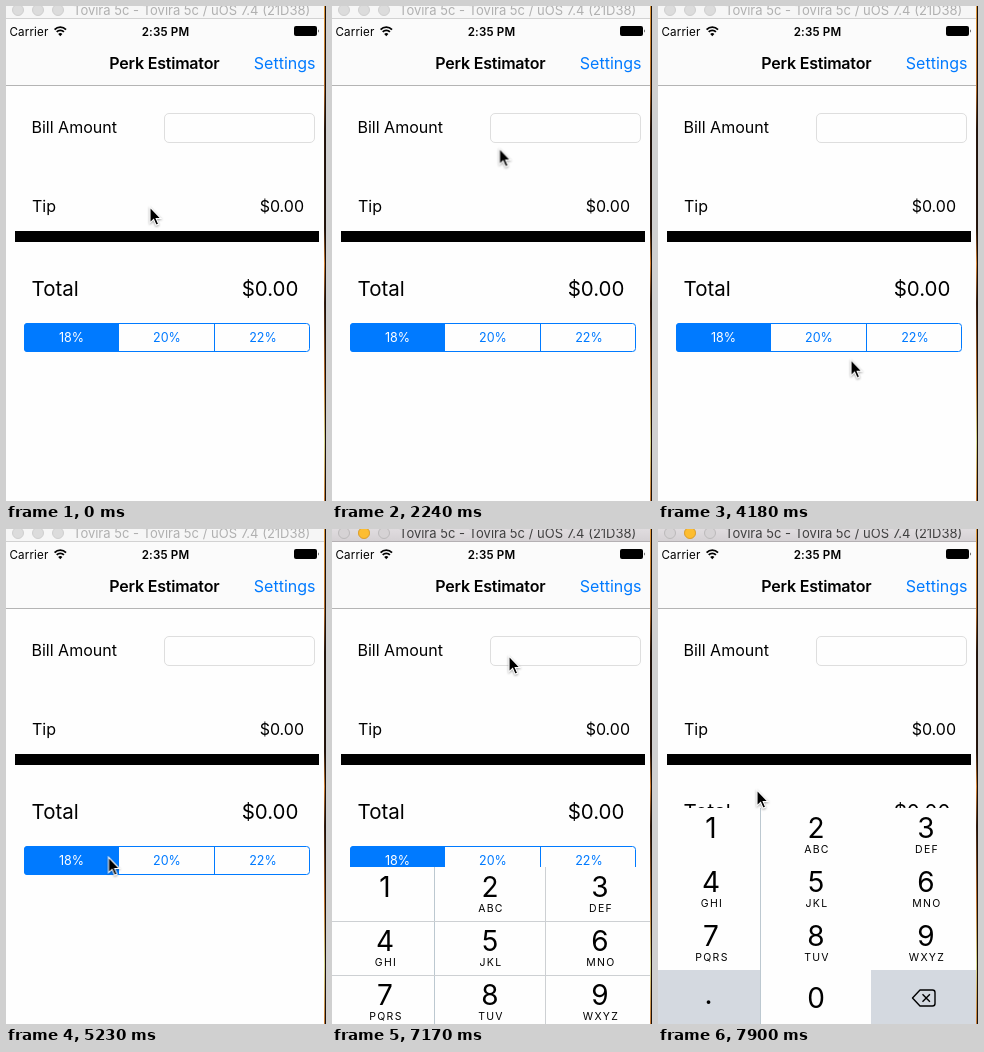
An HTML page that plays this animation: 320x495 px, repeating every 8000 ms.

```html
<!DOCTYPE html>
<html lang="en">
<head>
<meta charset="utf-8">
<title>Perk Estimator</title>
<style>
html, body { margin: 0; width: 100%; height: 100%; overflow: hidden; background: #fefefe; }
svg { display: block; width: 100%; height: 100%; }
text { font-family: Inter, Roboto, "Liberation Sans", sans-serif; white-space: pre; }
.label { font-size: 16px; }
.nav { font-size: 16px; font-weight: 600; letter-spacing: -.2px; }
.total { font-size: 20.5px; }
.status { font-size: 11.6px; letter-spacing: .15px; }
.bar { font-size: 13px; }
.seg { font-size: 12.5px; fill: #007aff; }
.digit { font-size: 28px; }
.letters { font-size: 10.5px; letter-spacing: 1.3px; }
.mid { text-anchor: middle; }
.end { text-anchor: end; }
.blue { fill: #007aff; }
#arrow { filter: drop-shadow(0 1px 1px rgba(0, 0, 0, .35)); }
</style>
</head>
<body>
<svg viewBox="0 0 320 495" preserveAspectRatio="none">
  <defs>
    <linearGradient id="desk" x2="0" y2="1">
      <stop offset="0" stop-color="#e09a3c"/>
      <stop offset=".17" stop-color="#b06a2a"/>
      <stop offset=".25" stop-color="#2a180e"/>
      <stop offset=".45" stop-color="#2a180e"/>
      <stop offset=".52" stop-color="#d88434"/>
      <stop offset=".6" stop-color="#3a2012"/>
      <stop offset=".75" stop-color="#c07430"/>
      <stop offset=".88" stop-color="#d8d890"/>
      <stop offset="1" stop-color="#c87a34"/>
    </linearGradient>
    <linearGradient id="chrome" x2="0" y2="1">
      <stop offset="0" stop-color="#e0dcdf"/>
      <stop offset="1" stop-color="#d4d0d3"/>
    </linearGradient>
    <g id="lights">
      <circle cx="12" cy="4" r="5.5"/><circle cx="32" cy="4" r="5.5"/><circle cx="52" cy="4" r="5.5"/>
    </g>
    <text id="caption" class="bar" x="67" y="9">Tovira 5c - Tovira 5c / uOS 7.4 (21D38)</text>
  </defs>

  <rect width="320" height="495" fill="#fefefe"/>
  <rect y="13" width="318" height="66" fill="#fbfbfb"/>
  <rect y="79" width="318" height="1" fill="#b4b4b4"/>

  <!-- window bar, idle and focused -->
  <g>
    <rect width="318" height="13" fill="#f6f6f6"/>
    <path d="M0 12.5H318" stroke="#d2d2d2"/>
    <use href="#lights" fill="#dcdcdc" stroke="#cfcfcf"/>
    <use href="#caption" fill="#b0b0b0"/>
  </g>
  <g id="focus" opacity="0">
    <rect width="318" height="13" fill="url(#chrome)"/>
    <path d="M0 12.5H318" stroke="#b4b0b3"/>
    <use href="#lights" fill="#d6d3d5" stroke="#bcbabb"/>
    <circle cx="32" cy="4" r="5.5" fill="#fdbd30" stroke="#e0a02a"/>
    <use href="#caption" fill="#404040"/>
  </g>

  <!-- status bar -->
  <text class="status" x="3.5" y="29.5">Carrier</text>
  <g fill="none" stroke="#000" stroke-width="1.8">
    <path d="M48.6 23.6a8 8 0 0 1 11.4 0M50.7 25.9a5 5 0 0 1 7.2 0"/>
    <path d="M54.3 30.2l-2.1-2.2a3 3 0 0 1 4.2 0z" fill="#000" stroke="none"/>
  </g>
  <text class="status mid" x="159.5" y="29.5" font-weight="600">2:35 PM</text>
  <rect x="288" y="20" width="23" height="10" rx="2"/>
  <path d="M312 23.2q1.5 1.8 0 3.6z"/>

  <text class="nav mid" x="158.3" y="63">Perk Estimator</text>
  <text class="label blue end" x="309.5" y="63">Settings</text>

  <!-- form -->
  <text class="label" x="25.5" y="127">Bill Amount</text>
  <rect x="158.5" y="107.5" width="150" height="29" rx="4.5" fill="#fefefe" stroke="#dedede"/>
  <text class="label" x="26" y="206">Tip</text>
  <text class="label end" x="298" y="206">$0.00</text>
  <rect x="9" y="225" width="304" height="11"/>
  <text class="total" x="25.5" y="290">Total</text>
  <text class="total end" x="292.5" y="289.5">$0.00</text>

  <rect x="18.5" y="317.5" width="285" height="28" rx="3" fill="#fefefe" stroke="#007aff"/>
  <path class="blue" d="M113 317H21.5a3.5 3.5 0 0 0-3.5 3.5V342.5a3.5 3.5 0 0 0 3.5 3.5H113z"/>
  <path d="M208.5 318v28" stroke="#007aff"/>
  <text class="seg mid" x="65.5" y="336" style="fill:#fff">18%</text>
  <text class="seg mid" x="161" y="336">20%</text>
  <text class="seg mid" x="257" y="336">22%</text>

  <g id="pad" transform="translate(0 500)"></g>

  <rect x="318" width="2" height="495" fill="#1c110b"/>
  <rect x="318" width="1" height="495" fill="url(#desk)"/>
  <path id="arrow" d="M0 0V15.8L3.6 12.4 6.1 18.2 8.6 17.1 6.2 11.5H11Z" stroke="#fff" stroke-width="1.1"/>
</svg>
<script>
const LOOP = 8000, TICK = 148.8, START = 1496, TICKS = 43;
const $ = id => document.getElementById(id);

// number pad, drawn from its own top-left corner
const rowH = 54, padH = 4 * rowH, cols = [53, 158, 268];
const keys = ['', 'ABC', 'DEF', 'GHI', 'JKL', 'MNO', 'PQRS', 'TUV', 'WXYZ'];
const digit = (s, x, y) => `<text class="digit mid" x="${x}" y="${y}">${s}</text>`;
let pad = `<rect width="318" height="216" fill="#fefefe"/>
  <path d="M0 162H102V216H0zM213 162H318V216H213z" fill="#d4d9e0"/>
  <path d="M102.5 0V216" stroke="#bcc8d0"/>
  <path id="rules" d="M0 54.5H318M0 108.5H318M0 162.5H318M213.5 0V216" stroke="#cdd0d3"/>`;
keys.forEach((s, i) => {
  const x = cols[i % 3], y = Math.floor(i / 3) * rowH;
  pad += digit(i + 1, x, y + 30) +
    `<text class="letters mid" x="${x + 1}" y="${y + 45}">${s}</text>`;
});
pad += digit('.', 50.5, 196) + digit(0, 158, 200) +
  `<g fill="none" stroke="#000" stroke-width="1.4" stroke-linejoin="round">
    <path d="M254.5 190L262 182H274.5Q277 182 277 184.5V195.5Q277 198 274.5 198H262Z"/>
    <path d="M264.5 186.3l7.4 7.4M271.9 186.3l-7.4 7.4"/>
  </g>`;
$('pad').innerHTML = pad;

// turning points of the pointer: tick, x, y
const stops = [
  [-1, 144, 201], [0, 155.5, 156], [3, 190, 66], [6, 160, 168], [9, 160, 168],
  [12, 154.5, 156], [19, 195, 364], [21, 179, 261], [22, 179, 261],
  [25, 102.5, 328], [28, 172, 111], [29, 177, 127], [39, 177, 127], [43, 99, 261]
];
const move = (x, y) => ({ transform: `translate(${x}px, ${y}px)` });

function pointer(k) {
  const i = Math.max(1, stops.findIndex(s => s[0] >= k));
  const [k0, x0, y0] = stops[i - 1], [k1, x1, y1] = stops[i];
  const e = (1 - Math.cos(Math.PI * (k - k0) / (k1 - k0))) / 2;
  return move(x0 + (x1 - x0) * e, y0 + (y1 - y0) * e);
}

// how far the pad still has to rise: a critically damped spring
function drop(k) {
  const s = 2.55 * Math.max(0, k - 37);
  return Math.floor(padH * (1 + s) * Math.exp(-s));
}

function play(id, pose) {
  const frames = [{ offset: 0, easing: 'step-end', ...pose(-1) }];
  for (let k = 0; k <= TICKS; k++)
    frames.push({ offset: (START + k * TICK) / LOOP, easing: 'step-end', ...pose(k) });
  frames.push({ offset: 1, ...pose(TICKS) });
  $(id).animate(frames, { duration: LOOP, iterations: Infinity });
}

play('arrow', pointer);
play('focus', k => ({ opacity: k < 31 ? 0 : 1 }));
play('pad', k => move(0, 495 - padH + drop(k)));
play('rules', k => ({ opacity: drop(k) ? 1 : 0 }));
</script>
</body>
</html>
```
